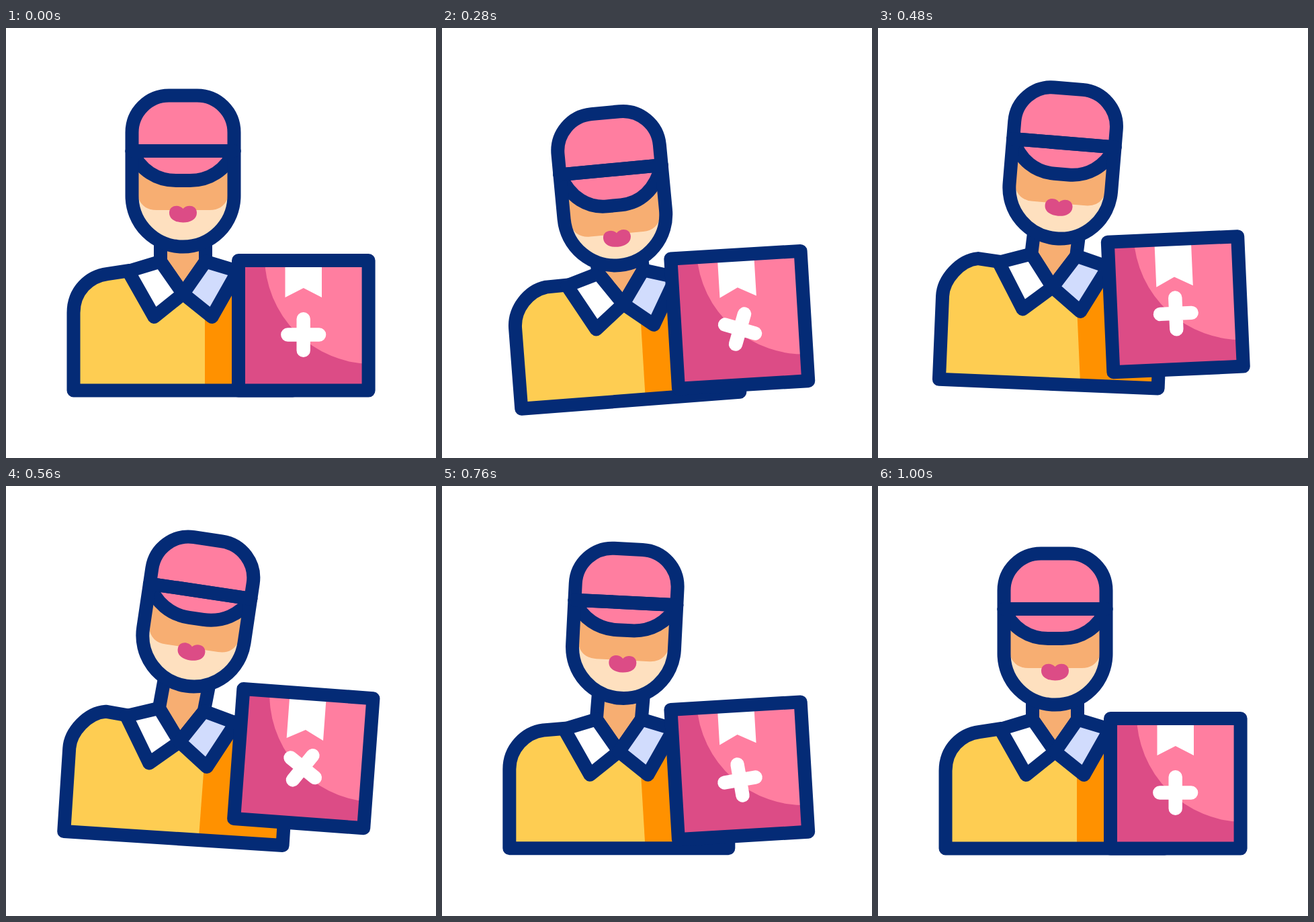
These frames come from a looping animation (640x640 px, 1040 ms). An HTML page:

```html
<!DOCTYPE html>
<html lang="en">
<head>
<meta charset="utf-8">
<title>Delivery courier</title>
<style>
html, body { margin: 0; width: 100%; height: 100%; overflow: hidden; background: #fff; }
svg { display: block; width: 100%; height: 100%; }
.line { stroke: #042b76; stroke-width: 20; stroke-linecap: round; stroke-linejoin: round; }
</style>
</head>
<body>
<svg viewBox="0 0 640 640">
  <defs>
    <clipPath id="torsoClip"><path id="torsoMask"/></clipPath>
    <clipPath id="headClip"><path id="headMask"/></clipPath>
    <clipPath id="boxClip"><rect x="346" y="346" width="193.6" height="193.6"/></clipPath>
  </defs>

  <path id="torsoFill" fill="#fecd52"/>
  <g clip-path="url(#torsoClip)">
    <rect id="shade" x="296" y="200" width="400" height="600" fill="#ff9100"/>
  </g>
  <g id="body">
    <path id="torsoLine" class="line" fill="none"/>
    <path id="neck" class="line" fill="#f7ae72"/>
    <path class="line" fill="#fff" d="M182 362L230 347.5L263.5 395.5L220.5 430Z"/>
    <path class="line" fill="#d1dcfd" d="M345 362L297 347.5L263.5 395.5L306.5 430Z"/>
    <g id="head">
      <g clip-path="url(#headClip)">
        <rect x="170" y="80" width="190" height="260" fill="#fee0bf"/>
        <path id="tan" fill="#f7ae72" d="M180 150V250H196Q202 271 224 271H303Q325 271 331 250H350V150Z"/>
        <path id="lips" fill="#dc4c86" d="M263.5 269C258 262 243 263 243 275C243 285 253 289.5 263.5 289.5S284 285 284 275C284 263 269 262 263.5 269Z"/>
        <rect x="170" y="80" width="190" height="103" fill="#ff7ea0"/>
      </g>
      <path id="brim" class="line" fill="#ff7ea0"/>
      <path id="headLine" class="line" fill="none"/>
      <path class="line" d="M187.5 183H339.5"/>
    </g>
  </g>

  <g id="box">
    <g clip-path="url(#boxClip)">
      <rect x="340" y="340" width="206" height="206" fill="#dc4c86"/>
      <circle cx="545" cy="340" r="160" fill="#ff7ea0"/>
      <path id="ribbon" fill="#fff"/>
    </g>
    <path id="plus" d="M419.3 456.5H466.1M442.7 433.1V479.9" stroke="#fff" stroke-width="20.4" stroke-linecap="round"/>
    <rect class="line" x="346" y="346" width="193.6" height="193.6" fill="none"/>
  </g>
</svg>
<script>
const LOOP = 1040, STEP = 40;
const MID = 263.5;
const NECK = { x: MID, y: 382 };

const el = id => document.getElementById(id);
const set = (id, name, value) => el(id).setAttribute(name, value);
const smooth = u => u * u * (3 - 2 * u);
const steep = u => u < 0.5 ? (2 * u) ** 2.2 / 2 : 1 - (2 - 2 * u) ** 2.2 / 2;

// Eased value between [time, value] keys.
function track(t, keys, ease = smooth) {
  if (t <= keys[0][0]) return keys[0][1];
  for (let i = 1; i < keys.length; i++) {
    const [t0, v0] = keys[i - 1], [t1, v1] = keys[i];
    if (t <= t1) return v0 + (v1 - v0) * ease((t - t0) / (t1 - t0));
  }
  return keys[keys.length - 1][1];
}

function torsoPath(lift) {
  const y = 366 - lift, low = 424 - lift;
  return `M100.5 539.5V${low}C100.5 391 124 ${y + 3.5} 151 ${y}L184 361L${MID} 396L343 361` +
    `L376 ${y}C403 ${y + 3.5} 426.5 391 426.5 ${low}V539.5Z`;
}

function headPath(top) {
  const y = 100.5 + top;
  return `M187.5 249.5V${y + 55}A55 55 0 0 1 242.5 ${y}H284.5A55 55 0 0 1 339.5 ${y + 55}` +
    `V249.5A76 76 0 0 1 187.5 249.5Z`;
}

function brimPath(drop) {
  const y = 227 + drop, bend = 212 + drop * 0.8;
  return `M187.5 183C200 ${bend} 225 ${y} 253 ${y}H274C302 ${y} 327 ${bend} 339.5 183Z`;
}

// Where a neck point ends up once the head has tilted and moved.
function withHead(x, y, tilt, dy) {
  const a = tilt * Math.PI / 180, dx = x - NECK.x, h = y - NECK.y;
  return `${NECK.x + dx * Math.cos(a) - h * Math.sin(a)} ${NECK.y + dx * Math.sin(a) + h * Math.cos(a) + dy}`;
}

function draw(t) {
  const sway = track(t, [[115, 0], [240, -4.75], [560, 3.7], [720, 0]]);
  const lift = track(t, [[120, 0], [440, 8.5], [600, 8.5], [840, 0]]);
  const nod = (down, up) => track(t, [[120, 0], [320, down], [640, up], [880, 0]]);
  const tilt = nod(-1.1, 5.8), headY = nod(13.6, -19);
  const look = nod(10.4, -5.3), capTop = nod(-3.3, 5.6);

  const bodyMove = `translate(${-lift * 0.08} ${-lift * 0.12}) rotate(${sway} 472 317)`;
  const torso = torsoPath(lift);
  for (const id of ["torsoFill", "torsoLine", "torsoMask"]) set(id, "d", torso);
  for (const id of ["torsoFill", "torsoMask", "body"]) set(id, "transform", bodyMove);

  set("neck", "d", `M${withHead(230, 318, tilt, headY)}L230 347.5L${MID} 395.5L297 347.5` +
    `L${withHead(297, 318, tilt, headY)}`);
  set("head", "transform", `translate(0 ${headY}) rotate(${tilt} ${NECK.x} ${NECK.y})`);
  const head = headPath(capTop);
  set("headMask", "d", head);
  set("headLine", "d", head);
  set("brim", "d", brimPath(look));
  set("lips", "transform", `translate(0 ${look * 0.9})`);
  set("tan", "transform", `translate(0 ${look * 0.85})`);

  const boxY = track(t, [[140, 0], [600, -38], [920, 0]]);
  const boxTurn = track(t, [[160, 0], [400, -6.9], [600, 5.5], [760, -3.4], [920, 0]]);
  const boxMove = `translate(0 ${boxY}) rotate(${boxTurn} 442.8 442.8)`;
  set("box", "transform", boxMove);
  set("shade", "transform", boxMove);

  const end = 401 + track(t, [[80, 0], [480, 15], [840, 0]]);
  set("ribbon", "d", `M415.5 350V${end}L442.8 ${end - 14}L470 ${end}V350Z`);
  set("plus", "transform", `rotate(${track(t, [[80, 0], [880, 180]], steep)} 442.7 456.5)`);
}

const start = performance.now();
function frame() {
  const t = (performance.now() - start) % LOOP;
  draw(Math.floor(t / STEP) * STEP);
  requestAnimationFrame(frame);
}
frame();
</script>
</body>
</html>
```
